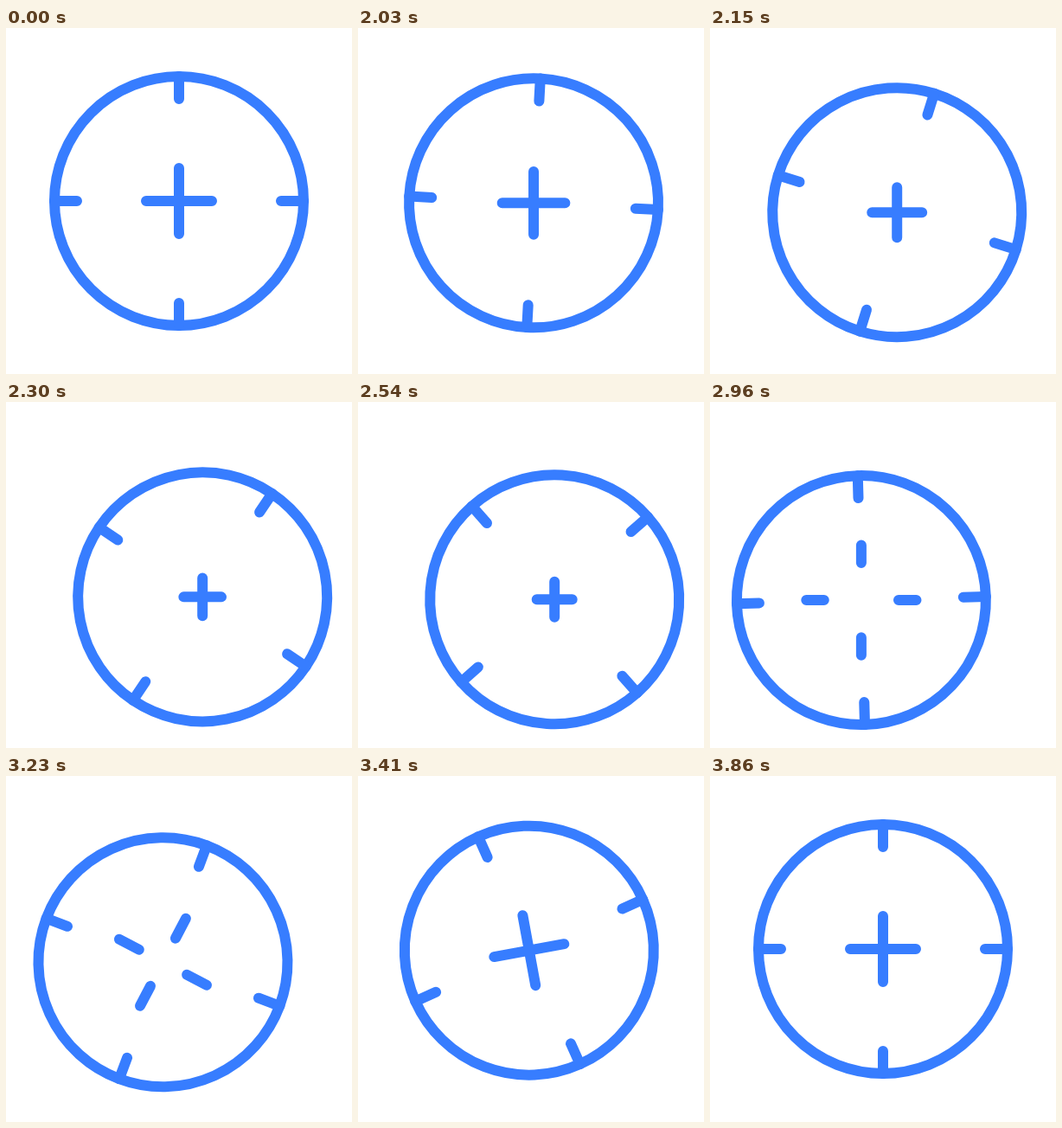
These frames come from a looping animation (400 by 400 pixels, 3950 ms). An HTML page:

```html
<!DOCTYPE html>
<html lang="en">
<head>
<meta charset="utf-8">
<title>Crosshair</title>
<style>
  html, body { margin: 0; width: 100%; height: 100%; overflow: hidden; background: #fff; }
  svg { display: block; width: 100%; height: 100%; }
</style>
</head>
<body>
<svg viewBox="0 0 400 400" fill="none" stroke="#377dff" stroke-width="12" stroke-linecap="round">
  <g id="target">
    <g id="ring">
      <circle r="144"/>
      <path d="M0-144V-118M0 144V118M-144 0H-118M144 0H118"/>
    </g>
    <path id="cross"/>
  </g>
</svg>
<script>
const LOOP = 3950, START = 2000, STEP = 30;
const [target, ring, cross] = ['target', 'ring', 'cross'].map(id => document.getElementById(id));

// Cubic Bezier easing, solved for the curve parameter by bisection
function bezier(x1, y1, x2, y2) {
  const curve = (a, b, s) => 3 * a * s * (1 - s) ** 2 + 3 * b * s * s * (1 - s) + s ** 3;
  return x => {
    if (x <= 0) return 0;
    if (x >= 1) return 1;
    let lo = 0, hi = 1;
    for (let i = 0; i < 30; i++) {
      const mid = (lo + hi) / 2;
      if (curve(x1, x2, mid) < x) lo = mid; else hi = mid;
    }
    return curve(y1, y2, lo);
  };
}

const settle = bezier(.167, .167, .667, 1);
const swing = bezier(.667, 0, .333, 1);
const spread = bezier(.5, 0, .3, 1);
const home = bezier(.4, 0, .2, 1);
const spin = bezier(.3, 0, .15, 1);

// Legs of the centre's route: right-down, left, back to the middle
const legs = [
  'M200 200C200 200 231.7 223.5 227.2 228.3',
  'M227.2 228.3C222.7 233 177.5 232.7 173 228',
  'M173 228C168.5 223.3 200 200 200 200'
].map(d => {
  const path = document.createElementNS('http://www.w3.org/2000/svg', 'path');
  path.setAttribute('d', d);
  return path;
});

const ramp = (k, from, to, ease) => ease((k - from) / (to - from));

function centre(k) {
  const [leg, p] = k < 18 ? [legs[0], ramp(k, 0, 12.5, settle)]
    : k < 36 ? [legs[1], ramp(k, 18, 35.5, swing)]
    : [legs[2], ramp(k, 36, 52, home)];
  return leg.getPointAtLength(p * leg.getTotalLength());
}

function draw(k) {
  const { x, y } = centre(k);
  const turn = 48.5 * ramp(k, 0, 18, settle) + 41.5 * ramp(k, 18, 35.5, swing) + 90 * ramp(k, 36, 62, spin);
  const back = ramp(k, 36, 54, home);
  const inner = 45 * (ramp(k, 18, 36, spread) - back);
  const outer = inner + 38 - 17.5 * (ramp(k, 0, 12.5, settle) - back);

  target.setAttribute('transform', `translate(${x} ${y})`);
  ring.setAttribute('transform', `rotate(${turn})`);
  cross.setAttribute('transform', `rotate(${90 * back})`);
  cross.setAttribute('d',
    `M0 ${-inner}V${-outer}M0 ${inner}V${outer}M${-inner} 0H${-outer}M${inner} 0H${outer}`);
}

function tick() {
  const t = performance.now() % LOOP;
  draw(Math.max(0, Math.floor((t - START) / STEP)));
  requestAnimationFrame(tick);
}
tick();
</script>
</body>
</html>
```
